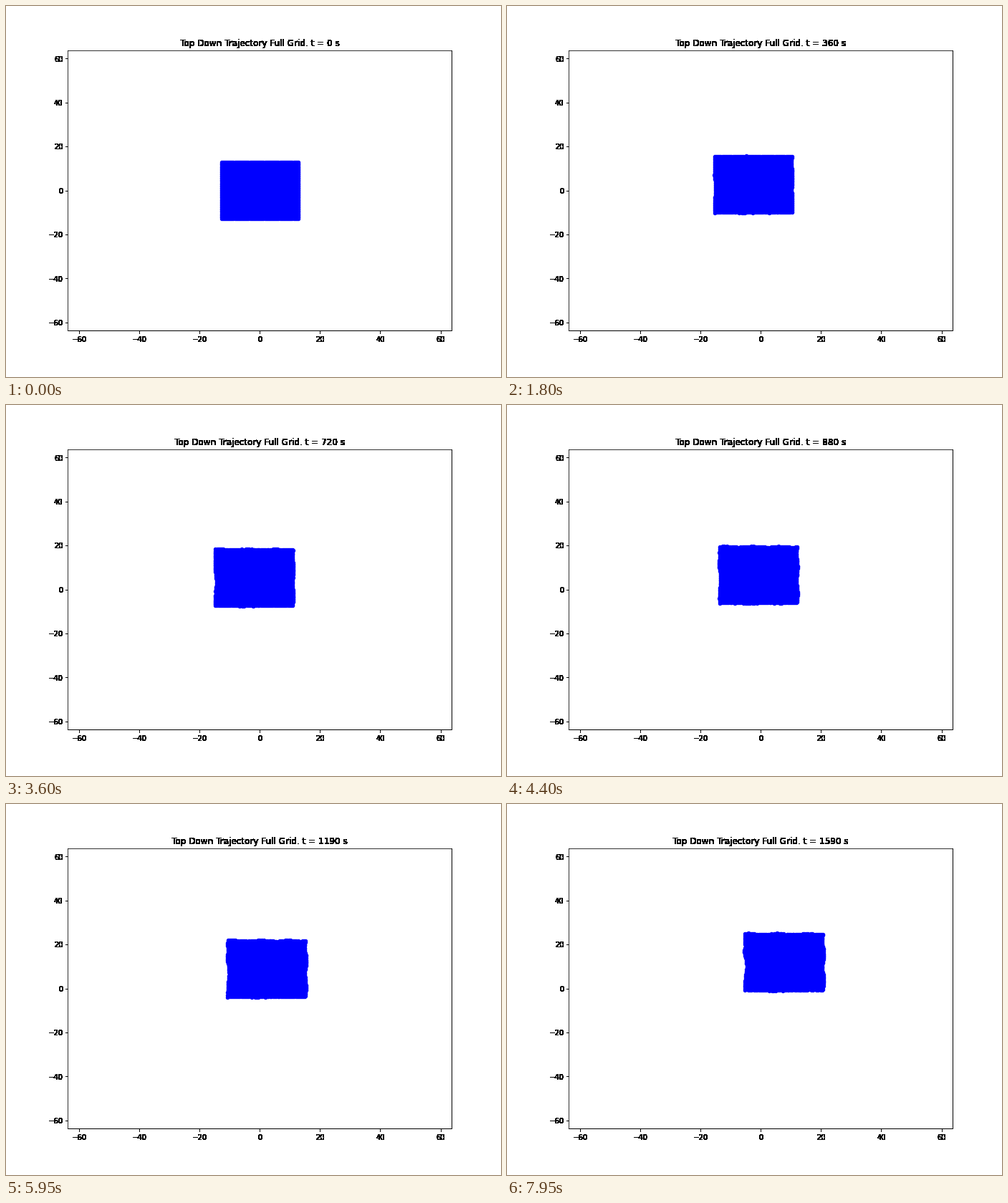
Animation, 691 px wide and 518 px high, one loop 8000 ms. Source, as a matplotlib script:

```python
import numpy as np
import matplotlib.pyplot as plt
from matplotlib.animation import FuncAnimation

FRAMES, STEP_MS = 160, 50
LIMIT, SIDE = 63.7, 52
HALF = LIMIT / 5

plt.rcParams.update({"font.family": "DejaVu Sans", "font.size": 10})
fig = plt.figure(figsize=(9.6, 7.2), dpi=72, facecolor="white")
ax = fig.add_axes([0.125, 0.125, 0.775, 0.755])
ax.set(xlim=(-LIMIT, LIMIT), ylim=(-LIMIT, LIMIT),
       xticks=range(-60, 61, 20), yticks=range(-60, 61, 20))
title = ax.set_title("")
for side in ("right", "bottom"):
    ax.spines[side].set_linewidth(1)


def harden(img, dpi):
    """Turn every touched pixel solid black, for text without soft edges."""
    out = np.zeros_like(img)
    out[..., 3] = img[..., 3] > 0
    return out, 0, 0


for artist in (ax.xaxis, ax.yaxis, title):
    artist.set_agg_filter(harden)

# Pixels per data unit
PX_X = 9.6 * 72 * 0.775 / (2 * LIMIT)
PX_Y = 7.2 * 72 * 0.755 / (2 * LIMIT)

# Square grid of drifters; u runs left to right, v top to bottom
line = np.linspace(-HALF, HALF, SIDE)
gx, gy = (a.ravel() for a in np.meshgrid(line, line))
u, v = (gx + HALF) / (2 * HALF), (HALF - gy) / (2 * HALF)


def bump(s, center, width):
    return np.exp(-((s - center) / width) ** 2)


# Deformation of the four sides at full strength, in pixels
left = 2.2 * bump(v, 0.58, 0.14) - 1.2 * bump(v, 0.32, 0.06)
right = 1.4 + 1.1 * np.cos(13.4 * (v - 0.36))
top = 0.6 * np.sin(17 * u + 0.8)
bottom = 0.3 * np.sin(23 * u) - 1.1 * bump(u, 0.36, 0.05)
rng = np.random.default_rng(4)
warp_x = (1 - u) * left + u * right + rng.normal(0, 0.25, u.size)
warp_y = (1 - v) * top + v * bottom + rng.normal(0, 0.25, u.size)


def drift(t):
    """Mean shift in pixels: a westward swing that turns back, going north."""
    east = t * (-10.02 + 2.455 * t - 0.087 * t * t)
    lag = 1.2 * np.sin(np.pi * min(t / 1.7, 1)) ** 2
    return east, 4.63 * t - lag


def positions(t):
    east, north = drift(t)
    grow = np.sqrt(t / 8)
    return np.column_stack([gx + (east + grow * warp_x) / PX_X,
                            gy + (north + grow * warp_y) / PX_Y])


dots = ax.scatter(gx, gy, s=20, c="blue", linewidths=1)


def update(i):
    dots.set_offsets(positions(i * STEP_MS / 1000))
    title.set_text(f"Top Down Trajectory Full Grid. t = {10 * i} s")
    return dots, title


anim = FuncAnimation(fig, update, frames=FRAMES, interval=STEP_MS,
                     init_func=lambda: update(0), repeat=True, repeat_delay=0)
plt.show()
```
